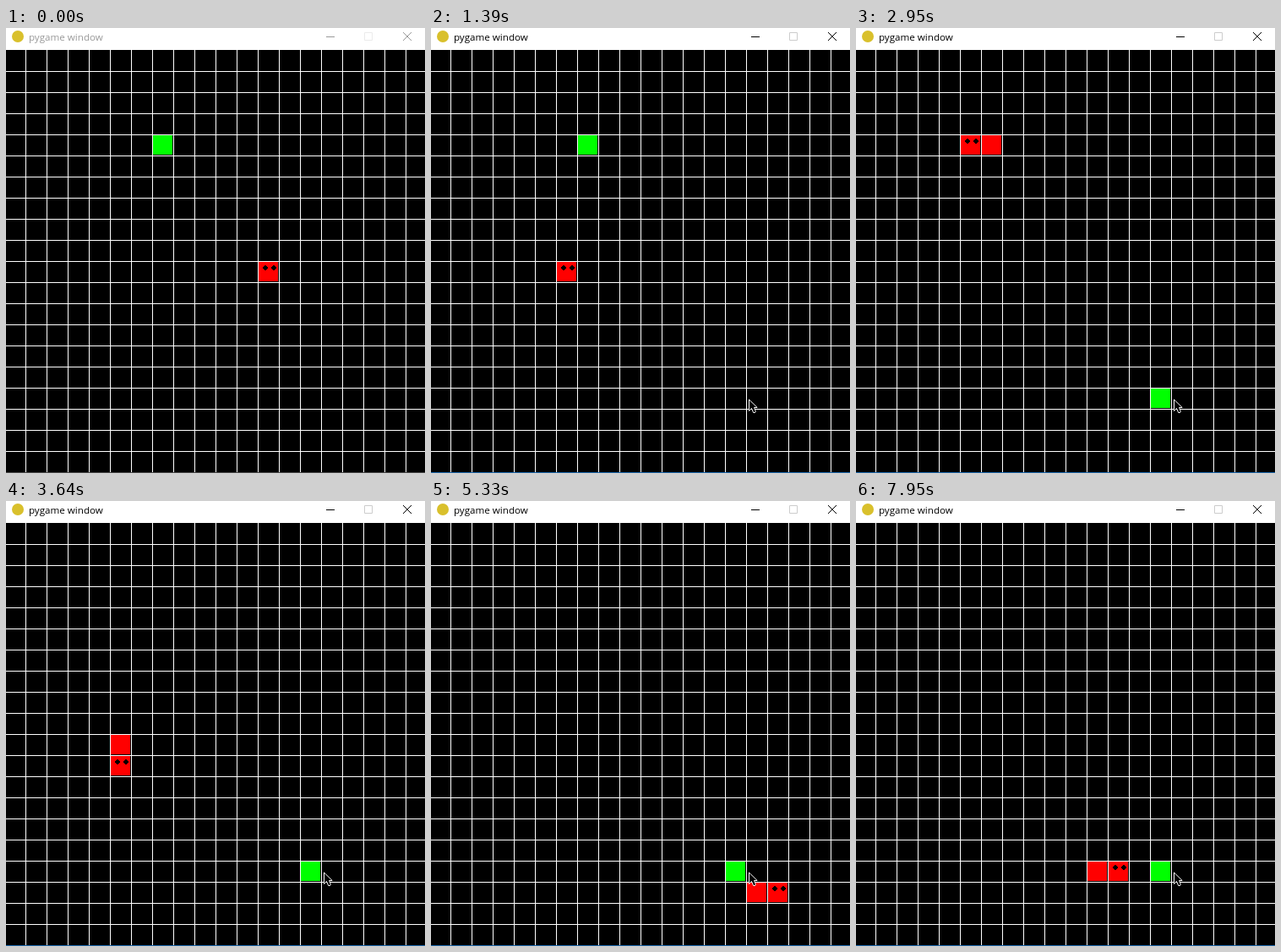
Animation of 496x527 px, one loop 8 s. Source, as an HTML page:

```html
<!DOCTYPE html>
<html lang="en">
<head>
<meta charset="utf-8">
<title>Snake</title>
<style>
  html, body { margin: 0; width: 100%; height: 100%; overflow: hidden; background: #000; }
  svg { display: block; }
  text { font: 11.6px "Open Sans", "Noto Sans", sans-serif; }
  .crisp { shape-rendering: crispEdges; }
</style>
</head>
<body>
<svg width="496" height="527" viewBox="0 0 496 527">
  <rect width="496" height="527"/>
  <path id="grid" class="crisp" stroke="#fff"/>
  <rect id="food" class="crisp" width="23" height="23" fill="#0f0"/>
  <rect id="tail" class="crisp" width="23" height="23" fill="#f00"/>
  <g id="head" class="crisp">
    <rect width="23" height="23" fill="#f00"/>
    <path id="eyes"/>
  </g>
  <rect id="border" class="crisp" y="526" width="496" height="1"/>
  <rect width="496" height="26" fill="#fff"/>
  <circle cx="14" cy="10" r="7" fill="#d9c02c"/>
  <text id="title" x="27" y="15">pygame window</text>
  <g fill="none">
    <path id="minimize" d="M379 10.5h10"/>
    <path id="maximize" d="M424.5 5.5h9v9h-9z"/>
    <path id="close" d="M470 5l10 10m0-10l-10 10"/>
  </g>
  <path id="cursor" d="M.5 1V14.5L3.5 11.5L5.7 16.5H7.5L8.3 14.8L6.6 10.5H10.2Z" stroke="#fff"/>
</svg>
<script>
const LOOP = 8000, CELL = 25, COLS = 20, FOCUS = 460;
const DIRS = { R: [1, 0], L: [-1, 0], U: [0, -1], D: [0, 1] };
const FOODS = [[7, 4], [14, 16]];

// first move, last move, directions in between
const RUNS = [
  [150, 380, "RRRR"], [540, 770, "RRRR"], [920, 1070, "RRR"],
  [1240, 1390, "RRR"], [1540, 1770, "RRRR"], [1930, 2090, "UUU"],
  [2240, 2400, "UUU"], [2550, 2780, "LLLL"], [2950, 3100, "LDD"],
  [3250, 3490, "DDDD"], [3640, 3870, "DDDD"], [4020, 4180, "DRR"],
  [4330, 4490, "RRR"], [4640, 4870, "RRRD"], [5060, 5180, "DRR"],
  [5330, 5560, "RRUU"], [5710, 5870, "UUL"], [6020, 6250, "LLLL"],
  [6410, 6560, "LLL"], [6710, 6870, "LLD"], [7020, 7250, "DDDD"],
  [7410, 7560, "RRR"], [7710, 7950, "RUUR"]
];

// when, tip position
const POINTER = [[380, 369, 515], [460, 371, 497], [540, 372, 484], [610, 373, 473],
  [690, 374, 464], [770, 375, 457], [840, 376, 448], [990, 376, 443], [1070, 376, 439]];

const $ = id => document.getElementById(id);
const wrap = n => (n + COLS) % COLS;
const place = (el, x, y) => el.setAttribute("transform", `translate(${x} ${y})`);
const placeCell = (el, [col, row]) => place(el, col * CELL - 1, row * CELL + 27);
const show = (el, on) => el.setAttribute("visibility", on ? "visible" : "hidden");

function buildStates() {
  const states = [{ time: 0, head: [12, 10], tail: null, food: 0 }];
  for (const [start, end, moves] of RUNS) {
    [...moves].forEach((key, i) => {
      const last = states[states.length - 1];
      const [dx, dy] = DIRS[key];
      const head = [wrap(last.head[0] + dx), wrap(last.head[1] + dy)];
      const ate = String(head) === String(FOODS[last.food]);
      states.push({
        time: start + (end - start) * i / (moves.length - 1),
        head,
        tail: ate || last.tail ? last.head : null,
        food: last.food + ate
      });
    });
  }
  return states;
}

function drawStatic() {
  let lines = "";
  for (let i = 1; i < COLS; i++) {
    lines += `M${i * CELL - 1.5} 26V526M0 ${i * CELL + 26.5}H496`;
  }
  $("grid").setAttribute("d", lines);
  const eye = "h2v1h1v1h1v2h-1v1h-1v1h-2v-1h-1v-1h-1v-2h1v-1h1z";
  $("eyes").setAttribute("d", `M7 4${eye}M17 4${eye}`);
}

function setFocus(on) {
  $("title").setAttribute("fill", on ? "#000" : "#999");
  $("minimize").setAttribute("stroke", on ? "#000" : "#999");
  $("close").setAttribute("stroke", on ? "#000" : "#999");
  $("maximize").setAttribute("stroke", on ? "#ccc" : "#ebebeb");
  $("border").setAttribute("fill", on ? "#1a64a8" : "#444");
}

const states = buildStates();

function render(t) {
  const state = states.filter(s => s.time <= t).pop();
  placeCell($("head"), state.head);
  placeCell($("food"), FOODS[state.food]);
  show($("tail"), state.tail);
  if (state.tail) placeCell($("tail"), state.tail);

  const tip = POINTER.filter(p => p[0] <= t).pop();
  show($("cursor"), tip);
  if (tip) place($("cursor"), tip[1], tip[2]);
  setFocus(t >= FOCUS);
}

drawStatic();
render(0);
const began = performance.now();
(function tick() {
  render((performance.now() - began) % LOOP);
  requestAnimationFrame(tick);
})();
</script>
</body>
</html>
```
